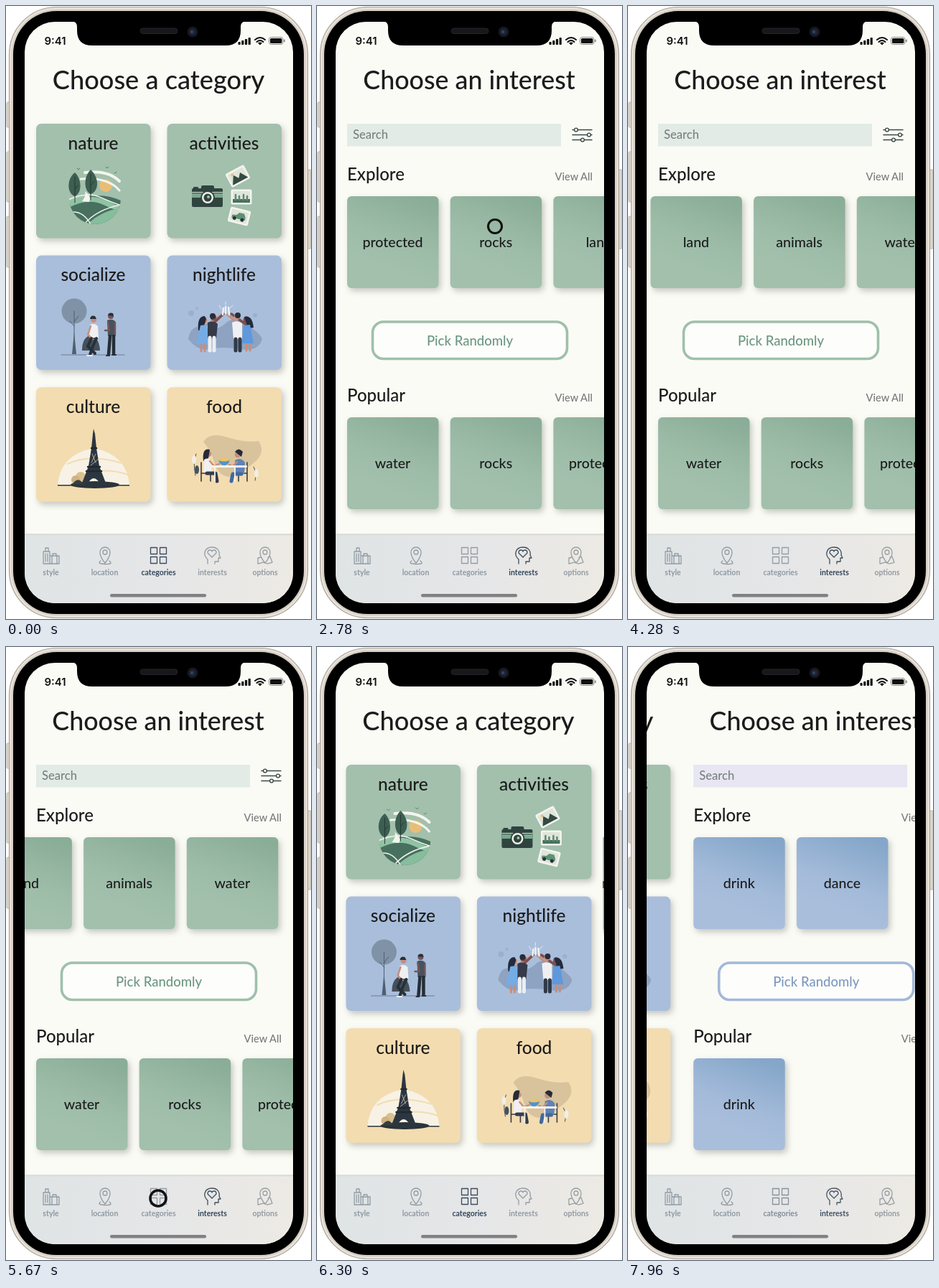
An HTML page that plays this animation: 425 px wide and 854 px high, repeating every 7990 ms.

```html
<!DOCTYPE html>
<html lang="en">
<head>
<meta charset="utf-8">
<title>Choose a category</title>
<style>
  html, body { margin: 0; width: 100%; height: 100%; overflow: hidden; background: #fff; }
  svg { display: block; width: 425px; height: 854px; }
  text { font-family: Lato, "Open Sans", sans-serif; font-weight: 500; }
  .card { filter: drop-shadow(3px 4px 4px rgba(60, 60, 50, .28)); }
</style>
</head>
<body>
<svg id="stage" viewBox="0 0 425 854"></svg>
<script>
const LOOP = 7990, PAGE = 374, PITCH = 143.7;
const INK = '#1c1c1c', DARK = '#27313a', SKIN = '#c58f7e';

// Drawing helpers returning SVG markup
const rect = (x, y, w, h, r, fill, extra = '') =>
  `<rect x="${x}" y="${y}" width="${w}" height="${h}" rx="${r}" fill="${fill}" ${extra}/>`;
const dot = (x, y, r, fill) => `<circle cx="${x}" cy="${y}" r="${r}" fill="${fill}"/>`;
const oval = (x, y, rx, ry, fill) => `<ellipse cx="${x}" cy="${y}" rx="${rx}" ry="${ry}" fill="${fill}"/>`;
const shape = (d, fill) => `<path d="${d}" fill="${fill}"/>`;
const line = (d, stroke, w = 1) =>
  `<path d="${d}" fill="none" stroke="${stroke}" stroke-width="${w}" stroke-linecap="round" stroke-linejoin="round"/>`;
const text = (x, y, s, size, fill = INK, anchor = 'middle', extra = '') =>
  `<text x="${x}" y="${y}" font-size="${size}" fill="${fill}" text-anchor="${anchor}" ${extra}>${s}</text>`;
const group = (inner, attrs = '') => `<g ${attrs}>${inner}</g>`;

const nature = group(
    shape('M86 277Q124 254 162 272V310H86Z', '#48705f') +
    line('M82 280Q112 262 138 274T164 284', '#8fc3a4', 7) +
    line('M82 272Q112 258 130 266T164 279', '#eef3ea', 1.5) +
    line('M104 310Q124 282 166 276', '#eef3ea', 1.5) +
    shape('M112 306Q130 286 162 281V312H112Z', '#86bd9c') +
    line('M82 290Q104 280 118 304', '#eef3ea', 1.5), 'clip-path="url(#hills)"') +
  dot(139, 250, 9, '#e9bd77') +
  line('M110 232Q142 228 158 244', '#f3f5ee', 4) + line('M104 241Q142 238 158 257', '#f3f5ee', 3) +
  shape('M96 232C84 241 85 262 96 265C107 260 105 240 96 232Z', '#3d5f52') +
  shape('M118 228C107 239 109 258 118 262C130 258 130 239 118 228Z', '#3d5f52') +
  line('M96 238V274M118 234V270M96 255l4-5M118 250l5-6', '#233a33', 1) +
  shape('M106 272Q112 264 110 258Q120 266 116 273Z', '#f3f5ee') +
  line('M99 226l2 2 2-2M139 224l2 2 2-2M151 232l1 1 2-2', '#587a69', 1);

const photo = (x, y, angle, inner) => group(
  rect(-14.5, -10.5, 29, 21, 2, '#f4f4ee') + rect(-12, -8, 24, 16, 1, '#dfe5d9') + inner,
  `transform="translate(${x} ${y}) rotate(${angle})"`);
const activities =
  rect(259, 254, 43, 26, 2, '#30443f') + rect(272, 250, 18, 6, 2, '#30443f') + rect(261, 252, 7, 3, 1, '#30443f') +
  rect(259, 261, 43, 6, 0, '#78a88d') + rect(259, 259, 43, 1, 0, '#e7ede2') +
  dot(281, 267, 10, '#30443f') + dot(281, 267, 8, '#edf1e8') + dot(281, 267, 5.5, '#30443f') + dot(282, 266, 2, '#a2c0ac') +
  photo(323, 237, -28, shape('M-12 8L-5-4 0 3 5-3 12 8Z', '#344a43') + dot(-6, -5, 2, '#e9bd77')) +
  photo(328, 266, 0, rect(-12, 3, 24, 5, 0, '#48705f') + line('M-8 4V-3M-3 4V-1M3 4V-3M8 4V-1', '#5b8a71', 2.5)) +
  photo(325, 293, 14, shape('M-10 4V0L-4-1-1-5H6L9 0V4Z', '#5b9174') + dot(-6, 4, 2.5, DARK) + dot(5, 4, 2.5, DARK));

const socialize =
  dot(95, 425, 17.5, '#8092a6') + line('M95 425V484M95 440l6-8M95 446l-6-7', '#4f5f70', 1) +
  shape('M92 485l3-30 3 30Z', '#4f5f70') + line('M77 486H165', '#5d6b7c', .8) +
  shape('M106 480Q106 461 118 459Q130 462 131 480Z', '#45505c') +
  dot(122, 437, 4, SKIN) + shape('M117 436Q118 430 124 432L126 436Z', DARK) +
  shape('M117 444Q124 441 128 446L129 462H116Z', '#f1eff0') +
  line('M118 446L114 458 121 464', SKIN, 2.4) +
  line('M119 463L114 474 124 484M126 463L121 474 117 486', DARK, 4) + rect(112, 486, 9, 2, 1, '#eee') +
  dot(146, 432, 4, '#77545a') + shape('M142 431Q143 426 149 428L150 432Z', DARK) +
  shape('M141 438Q147 435 152 439L153 460H142Z', '#46535e') +
  line('M142 440L144 452 138 452M152 441L152 457', '#77545a', 2.4) +
  line('M145 460L143 485M150 460L150 484', '#252d37', 4.5) + line('M140 487h4M148 486h5', DARK, 2);

const nightlife =
  shape('M254 464Q257 443 276 448T306 442T336 444T357 464Q352 482 326 478T284 478T254 464Z', '#8da3c1') +
  dot(258, 428, 4, '#9bb0cf') + dot(266, 421, 2, '#9bb0cf') + dot(347, 431, 3, '#9bb0cf') +
  line('M277 446L300 431M324 443L309 430', SKIN, 3.5) + line('M289 442L303 429M335 444L314 429', '#7c4e50', 3.5) +
  line('M302 430l1-9M306 428V419M311 430l-1-10', '#f1f2f4', 2.4) + line('M300 422l-3-5M306 416v-4M312 421l4-4', '#f4f4f4', .8) +
  line('M272 468V481M277 468V481M335 468V480M340 468V480', SKIN, 3) +
  dot(276, 438, 4.5, SKIN) + shape('M268 452Q266 432 277 432L279 436 274 452Z', '#232b3c') +
  shape('M271 445L280 444 283 471H265Z', '#76ace6') +
  dot(289, 434, 4.3, '#7c4e50') + dot(288, 432, 4, '#272c38') +
  shape('M281 441Q289 437 295 443L293 463H281Z', '#353a48') + line('M284 462V480M290 462V480', '#eceef2', 5) +
  dot(322, 433, 4.3, SKIN) + dot(323, 431, 4, '#272c38') +
  shape('M315 441Q322 437 329 442L329 464H317Z', '#f0f0f3') + line('M320 464V480M326 464V480', '#303947', 5) +
  dot(335, 437, 4.5, '#7c4e50') + shape('M332 433Q343 430 345 448L337 449Z', '#232b3c') +
  shape('M331 445L340 444 345 470H329Z', '#5e98dd');

const culture =
  shape('M72 668Q75 625 122 616Q169 625 172 668Z', '#f7f2e5') +
  line('M86 638Q116 623 162 637M130 648Q150 646 170 653', '#f3dcb0', 2) +
  dot(104, 656, 7, '#dac08f') + dot(97, 660, 6, '#cfb382') +
  oval(124, 667, 34, 5, '#2a343a') + rect(72, 667, 100, 1.5, 0, '#2a343a') +
  shape('M122 589L124 596 126 616 130 641 140 667H132Q122 649 113 667H105L115 641 119 616 121 596Z', '#2c3640') +
  line('M119 616h7M114 642h17M112 648h21', '#202831', 2.5) +
  line('M120 624l5 12M125 624l-6 12M118 640l11-9', '#e8dfc9', .7) +
  shape('M92 667Q100 654 108 666Z', '#33403f');

const food =
  shape('M275 607Q284 593 309 601T352 606Q362 622 347 635T318 656Q297 658 291 638T275 607Z', '#d8c39d') +
  line('M264 654Q260 635 265 624M347 661Q350 651 345 642', '#47525c', 1) +
  oval(262, 632, 3, 6, '#f1eee4') + oval(266, 646, 3, 6, '#47525c') + oval(349, 651, 3, 6, '#f1eee4') +
  line('M272 636V662M272 651H285V662M336 636V662M336 651H324V662', '#343b43', 1.6) +
  dot(282, 624, 4.3, SKIN) + shape('M284 618Q273 615 275 634L282 630Z', '#252b36') +
  shape('M276 632Q283 628 286 635L287 650H275Z', '#f1eff0') + line('M284 634L290 641 297 638', SKIN, 2.4) +
  line('M280 651H292L294 662', '#343d4b', 5) +
  dot(323, 625, 4.3, SKIN) + shape('M319 621Q324 614 330 621L328 628Z', '#252b36') +
  shape('M319 633Q327 628 333 636L332 652H320Z', '#5f83b6') + line('M322 635L316 641 311 639', SKIN, 2.4) +
  line('M328 652H316L314 662', '#4269a0', 5) +
  rect(286, 640, 50, 3, 1, '#f5f3ee') + line('M291 643V662M319 643V662', '#f5f3ee', 1.8) +
  shape('M296 632H312Q310 640 304 640T296 632Z', '#4e94cb') + oval(304, 632, 8, 2.5, '#ecc06e');

const GREEN = '#a2c0ac', BLUE = '#a9bedb', TAN = '#f3dcb0';
const categoryCard = (name, col, row, color, art) => {
  const x = 42 + col * 182.5, y = 164 + row * 183.6;
  return rect(x, y, 159.5, 159.5, 7, color, 'class="card"') + art + text(x + 79.5, y + 35.5, name, 24.5);
};
const categories = text(212.5, 116, 'Choose a category', 36.2) +
  categoryCard('nature', 0, 0, GREEN, nature) + categoryCard('activities', 1, 0, GREEN, activities) +
  categoryCard('socialize', 0, 1, BLUE, socialize) + categoryCard('nightlife', 1, 1, BLUE, nightlife) +
  categoryCard('culture', 0, 2, TAN, culture) + categoryCard('food', 1, 2, TAN, food);

const themes = {
  green: { search: '#e2ebe6', border: '#9fc0aa', label: '#6c9780',
    explore: ['protected', 'rocks', 'land', 'animals', 'water'], popular: ['water', 'rocks', 'protected'] },
  blue: { search: '#e7e6f2', border: '#a3b8d8', label: '#7d98c2',
    explore: ['drink', 'dance'], popular: ['drink'] }
};
const cardRow = (names, y, theme) => names.map((name, i) => {
  const x = 42 + i * PITCH;
  return rect(x, y, 127.5, 128, 6, `url(#${theme})`, 'class="card"') + text(x + 63.5, y + 71, name, 19.6);
}).join('');
const interests = theme => {
  const { search, border, label, explore, popular } = themes[theme];
  const section = (name, y) => text(42, y, name, 24, INK, 'start') + text(384, y, 'View All', 14.6, '#777b7a', 'end');
  const knob = (x, y) => `<circle cx="${x}" cy="${y}" r="2.4" fill="#fbfbf6" stroke="#3b4a46" stroke-width="1.4"/>`;
  return group(
    text(212, 116, 'Choose an interest', 35.8) +
    rect(42, 164, 298, 31.5, 0, search) + text(50, 185, 'Search', 16.6, '#7b807e', 'start') +
    line('M356 172.5H383M356 179.5H383M356 186.5H383', '#3b4a46', 1.5) + knob(361, 172.5) + knob(379, 179.5) + knob(370, 186.5) +
    section('Explore', 243) + group(cardRow(explore, 265, theme), 'class="scroller"') +
    rect(77.5, 440, 271, 51.5, 15, '#fdfdfb', `stroke="${border}" stroke-width="3.6"`) +
    text(213, 473, 'Pick Randomly', 18.5, label) +
    section('Popular', 551) + cardRow(popular, 573, theme),
    `id="${theme}Page" clip-path="url(#page)"`);
};

const pin = (x, y) => `M${x} ${y + 15}C${x - 6} ${y + 8} ${x - 7} ${y + 4} ${x - 7} ${y}A7 7 0 0 1 ${x + 7} ${y}C${x + 7} ${y + 4} ${x + 6} ${y + 8} ${x} ${y + 15}ZM${x - 3} ${y}a3 3 0 0 0 6 0a3 3 0 0 0-6 0`;
const tabs = [
  [62.5, 'style', 'M52 760h9v17h-9zM55 760v-5h4v5M55 763v11M58 763v11M61 766h13v11H61M65 766v-3h5v3M64 766v11M71 766v11'],
  [137.5, 'location', pin(138, 761) + 'M132 773Q126 777 138 777.500T144 773'],
  [212.5, 'categories', 'M201.500 754.500h9v9h-9zM214.500 754.500h9v9h-9zM201.500 767.500h9v9h-9zM214.500 767.500h9v9h-9z'],
  [287.5, 'interests', 'M281 777v-6C274 765 276 754 287 754C296 754 298 761 297 765l2 4h-3v5h-5v3M287 768l-6-6q0-4 3-4t3 2q0-2 3-2t3 4Z'],
  [361, 'options', pin(361, 761).replace(/ 8 /g, ' 8 ') + 'M355 768l-4 1v8l7-2 6 2 7-2-3-8-3 1']
];
const tabBar = rect(26, 737, 374, 96, 0, 'url(#bar)') + rect(26, 735, 374, 2.5, 0, '#dcdedb') +
  tabs.map(([x, name, d]) => group(
    line(d, '#3c4d5b', 1.3) + text(x, 793, name, 10.5, '#33475a', 'middle', 'style="font-weight:700"'), `id="${name}Tab"`)).join('') +
  rect(145, 819, 134, 4.5, 2.2, '#818184');

const status = text(68.5, 53.5, '9:41', 15, '#111', 'middle', 'style="font-family:Inter,sans-serif;font-weight:600"') +
  [0, 1, 2, 3].map(i => rect(323.5 + i * 4.7, 50 - i * 2, 3.2, 4 + i * 2, .8, '#111')).join('') +
  line('M347 47Q354 41 361 47M349.500 50Q354 46 358.500 50', '#111', 2) + shape('M351 51.500Q354 49.500 357 51.500L354 54.500Z', '#111') +
  rect(366.5, 43.5, 19.5, 10, 3, 'none', 'stroke="#888" stroke-width="1"') + rect(368, 45, 16.5, 7, 1.6, '#111') + rect(387.2, 46.5, 1.5, 4, .7, '#888');

const body =
  [[1, 134, 35], [1, 203, 70], [1, 293, 71], [420, 228, 110]].map(([x, y, h]) =>
    rect(x, y, 5, h, 1.5, '#ded7cd', 'stroke="#aaa39a" stroke-width=".8"')).join('') +
  rect(4.5, 1.5, 416, 851, 66, '#e9e3da', 'stroke="#a9a298" stroke-width="1.2"') +
  rect(7.5, 4.5, 410, 845, 63, '#d5cec4') + rect(10, 7, 405, 840, 60, '#000');
const notch = shape('M92 21Q99 22 99 29V34Q99 55 120 55H306Q327 55 327 34V29Q327 22 334 21Z', '#000') +
  rect(187, 31, 52, 7.5, 3.7, '#17181c', 'stroke="#24252a" stroke-width="1"') +
  dot(260, 36, 7.5, '#16171d') + dot(260, 36, 4.5, '#1d2638') + dot(259, 36, 2, '#31456a');

const gradient = (id, coords, stops) => `<linearGradient id="${id}" ${coords}>` +
  stops.map(([at, color]) => `<stop offset="${at}" stop-color="${color}"/>`).join('') + '</linearGradient>';
const clip = (id, inner) => `<clipPath id="${id}">${inner}</clipPath>`;
const slant = 'x1=".75" y1="0" x2=".45" y2=".8"';
const $ = id => document.getElementById(id);

$('stage').innerHTML = '<defs>' +
  gradient('green', slant, [[0, '#8aad97'], [.65, '#9ebda9'], [1, GREEN]]) +
  gradient('blue', slant, [[0, '#84a6c9'], [.65, '#a3bad9'], [1, BLUE]]) +
  gradient('bar', 'x1="0" x2="1"', [[0, '#dfe4e5'], [.5, '#e5e6e8'], [1, '#edeae4']]) +
  clip('screen', rect(26, 22, 374, 810, 42, '#000')) +
  clip('page', rect(26, 22, 374, 810, 0, '#000')) +
  clip('hills', dot(124, 268, 36, '#000')) + '</defs>' +
  body +
  group(rect(26, 22, 374, 810, 0, '#fbfbf6') + group(categories, 'id="categoryPage"') +
    interests('green') + interests('blue') + tabBar + status, 'clip-path="url(#screen)"') +
  notch + '<circle id="ring" fill="none" stroke="#111"/>';

const clamp = x => Math.min(1, Math.max(0, x));
const push = (t, start) => 1 - (1 - clamp((t - start) / 300)) ** 1.7;
const scrollAt = t => 365 * (1 - Math.cos(Math.PI * clamp((t - 3290) / 1380))) / 2;
const presses = [
  { from: 1000, to: 1450, x: 140, y: 262, r: 11 },
  { from: 2780, to: 3800, x: 248, y: 307, r: 9.5, drags: true },
  { from: 5670, to: 6000, x: 212, y: 768, r: 11 },
  { from: 7420, to: 7740, x: 348, y: 406, r: 11 }
];
const FADE = 100;
const move = (el, x) => el.setAttribute('transform', `translate(${x} 0)`);
const scroller = document.querySelector('#greenPage .scroller');

function draw(t) {
  const isBlue = t > 7000;
  const progress = push(t, 1462) - push(t, 6013) + push(t, 7752);
  const shift = progress * PAGE;
  move($('categoryPage'), -shift);
  for (const theme of ['green', 'blue']) {
    const page = $(theme + 'Page');
    move(page, PAGE - shift);
    page.style.display = isBlue === (theme === 'blue') ? '' : 'none';
  }
  move(scroller, -scrollAt(t));
  for (const [, name] of tabs) {
    const active = name === 'categories' ? 1 - progress : name === 'interests' ? progress : 0;
    $(name + 'Tab').setAttribute('opacity', .48 + .52 * active);
  }
  const press = presses.find(p => t >= p.from && t < p.to + FADE), ring = $('ring');
  ring.style.display = press ? '' : 'none';
  if (press) {
    ring.setAttribute('cx', press.x - (press.drags ? scrollAt(t) : 0));
    ring.setAttribute('cy', press.y);
    ring.setAttribute('r', press.r);
    ring.setAttribute('stroke-width', press.r / 3.1);
    ring.setAttribute('opacity', 1 - clamp((t - press.to) / FADE));
  }
}

const began = performance.now();
(function tick() {
  draw((performance.now() - began) % LOOP);
  requestAnimationFrame(tick);
})();
</script>
</body>
</html>
```
